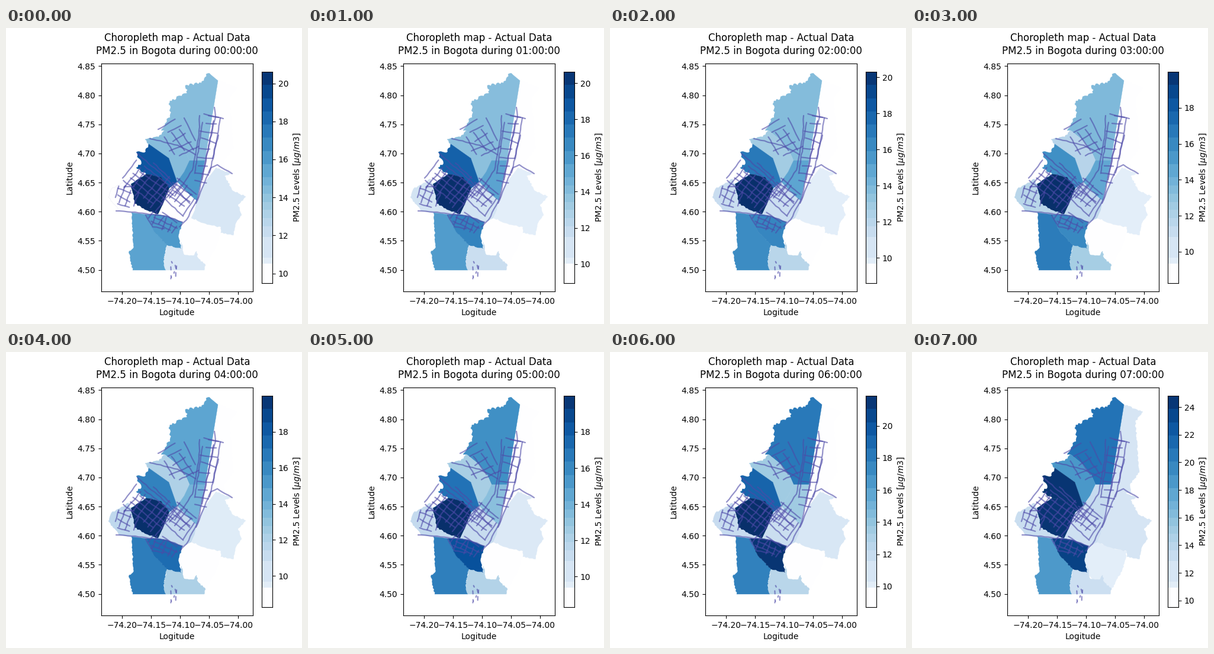
A matplotlib script that plays this animation: 500x500 px, repeating every 8 s.

```python
import numpy as np
import matplotlib.pyplot as plt
from matplotlib.animation import FuncAnimation
from matplotlib.collections import LineCollection
from matplotlib.patches import Polygon, Rectangle

SIZE = 500
HOURS = 8
LEFT, RIGHT, TOP, BOTTOM = 161, 416.675, 60, 445
BAR_TOP, BAR_BOTTOM = 74.25, 430.75
PAPER = "#fefeff"
KEY_HOURS = [0, 1, 3, 6, 7]
LOW = [9.5, 8.95, 8.6, 8.26, 8.28, 8.31, 8.71, 9.53]
HIGH = [20.6, 20.62, 20.3, 19.99, 19.99, 19.99, 21.86, 24.81]

rng = np.random.default_rng(7)
blues = plt.get_cmap("Blues")
fig = plt.figure(figsize=(5, 5), dpi=100, facecolor="white")


def pixel_axes(left, top, right, bottom):
    """Axes whose data units are stage pixels, y downwards."""
    a = fig.add_axes([left / SIZE, 1 - bottom / SIZE,
                      (right - left) / SIZE, (bottom - top) / SIZE])
    a.set_xlim(left, right)
    a.set_ylim(bottom, top)
    return a


ax = pixel_axes(LEFT, TOP, RIGHT, BOTTOM)


def line(*xy):
    return np.array(xy, float).reshape(-1, 2)


def rough(pts, amp, step=2.6):
    """Polyline with small random offsets across its direction."""
    out = []
    for a, b in zip(pts[:-1], pts[1:]):
        d = b - a
        length = np.hypot(*d)
        normal = np.array([-d[1], d[0]]) / length
        n = max(1, int(length / step))
        out += [a + d * k / n + normal * (rng.uniform(-amp, amp) if k else 0)
                for k in range(n)]
    return np.array(out + [pts[-1]])


def coast(*xy, amp=1.2):
    return rough(line(*xy), amp)


districts = []


def district(levels, *pieces):
    """Area with its share of the colour range at the key hours."""
    patch = ax.add_patch(Polygon(np.vstack(pieces), closed=True, lw=0.3))
    districts.append((patch, np.broadcast_to(levels, len(KEY_HOURS))))


# Borders shared by neighbouring districts
suba_north = line(268, 173, 289, 190, 303, 208, 310, 224)
suba_west = line(241, 196, 275, 220, 282, 240, 289, 260)
airport_top = coast(211, 264, 237, 247, 262, 252, 276, 271, amp=0.9)
airport_low = coast(211, 264, 217, 297, 240, 309, 257, 315)
avenue = line(257, 315, 266, 296, 276, 271)
foothill = line(322, 292, 319, 308, 313, 321)
hill = coast(237, 315, 250, 344, 272, 367, amp=1)
valley = coast(272, 367, 296, 373, amp=0.8)
ridge = coast(296, 373, 291, 352, 298, 328, amp=1)

district([0, 0, 0, 0, .17],
         coast(358, 89, 390, 101, 377, 118, 382, 180, 384, 203, 368, 224,
               371, 238, 355, 236),
         line(335, 262, 322, 292, 336, 224))
district([0, 0, 0, 0, .10],
         coast(298, 328, 313, 321, 340, 332, 363, 336, 355, 368, 337, 401),
         line(305, 384), ridge)
district([.43, .43, .45, .72, .74],
         line(358, 89),
         coast(346, 79, 338, 78, 330, 93, 303, 97, 306, 110, 277, 123,
               277, 148, 262, 173, amp=2.4),
         suba_north, line(336, 224))
district([.43, .42, .30, .37, .60],
         suba_north, line(301, 243), suba_west[::-1],
         coast(241, 196, 235, 188, 258, 184, 268, 173))
district([.59, .55, .53, .37, .25],
         line(310, 224, 336, 224, 322, 292, 310, 282, 289, 260, 301, 243))
district([.85, .81, .63, .80, .98],
         suba_west, airport_top[::-1],
         coast(237, 247, 220, 236, 229, 229, 220, 210, 236, 209, 241, 196,
               amp=2))
district([1, 1, 1, 1, .98], airport_top, avenue[::-1], airport_low[::-1])
district([.05, .18, .29, .24, .23],
         airport_low, line(212, 312),
         coast(191, 309, 173, 286, 178, 272, 207, 255, 211, 264))
district([0, .18, .27, .23, .21],
         avenue, line(289, 260, 310, 282), foothill, line(298, 328, 272, 318))
district([.55, .58, .71, .69, .59],
         line(212, 312), hill, coast(272, 367, 266, 394, 270, 409),
         coast(214, 409, 208, 377, 216, 370, 212, 312))
district([.59, .68, .66, .98, .93],
         hill, valley, ridge, line(272, 318, 257, 315))
district([.16, .23, .35, .29, .22],
         coast(270, 409, 266, 394, 272, 367), valley,
         coast(296, 362, 301, 383, 318, 384, 322, 377, 324, 388, 337, 401,
               335, 409))
district([.16, .10, .10, .16, .17],
         foothill[::-1], line(335, 262),
         coast(355, 236, 381, 246, 369, 250, 383, 275, 405, 285, 392, 298,
               398, 316, 388, 330, 384, 350, 363, 346, 363, 336, 340, 332,
               313, 321))

roads = []


def road(*xy):
    roads.append(rough(line(*xy), 0.7, 6))


def street_grid(cx, cy, length, width, angle, gap):
    """Broken, slightly crooked streets along and across one direction."""
    a = np.radians(angle)
    along = np.array([np.cos(a), np.sin(a)])
    across = np.array([-along[1], along[0]])
    for u, v, reach, span in ((along, across, length, width),
                              (across, along, width, length)):
        for offset in np.arange(-span / 2, span / 2 + 1, gap):
            start = -reach * rng.uniform(0.2, 0.5)
            stop = reach * rng.uniform(0.2, 0.5)
            tilt = rng.uniform(-3, 3, 2)
            road(*((cx, cy) + u * start + v * (offset + tilt[0])),
                 *((cx, cy) + u * stop + v * (offset + tilt[1])))


# Main avenues
road(352, 134, 354, 150, 340, 210, 324, 287, 305, 324, 293, 336)
road(327, 148, 326, 180, 315, 240, 285, 284)
road(382, 246, 357, 231, 346, 236, 321, 296)
road(342, 148, 367, 153)
road(362, 152, 354, 198, 349, 220)
road(186, 309, 212, 311, 272, 318, 298, 328)
road(236, 316, 248, 336, 267, 339)
road(222, 212, 275, 258, 310, 296)
road(243, 187, 290, 198, 320, 214)

# Neighbourhoods
street_grid(337, 208, 120, 32, 101, 14)
street_grid(292, 188, 62, 50, 62, 14)
street_grid(244, 266, 84, 64, 38, 11)
street_grid(292, 284, 62, 48, 40, 11)
street_grid(202, 284, 34, 34, 20, 11)
street_grid(267, 330, 52, 24, 30, 9)
for _ in range(8):
    x, y = rng.uniform(270, 289), rng.uniform(392, 422)
    road(x, y, x + rng.uniform(-2, 2), y + rng.uniform(2, 7))

ax.add_collection(LineCollection(roads, colors=[(0.30, 0.29, 0.66, 0.6)],
                                 linewidths=1.6, capstyle="round", zorder=3))

ax.set_xticks(196.4 + 49 * np.arange(5),
              [f"\u2212{74.2 - 0.05 * k:.2f}" for k in range(5)])
ax.set_yticks(408.5 - 49.15 * np.arange(8),
              [f"{4.5 + 0.05 * k:.2f}" for k in range(8)])
ax.set_xlabel("Logitude")
ax.set_ylabel("Latitude")


def heading(baseline, text=""):
    return fig.text((LEFT + RIGHT) / 2 / SIZE, 1 - baseline / SIZE, text,
                    ha="center", va="baseline", fontsize=12)


heading(22, "Choropleth map - Actual Data")
title = heading(44)

bar = pixel_axes(432.175, BAR_TOP, 450, BAR_BOTTOM)
bar.set_xticks([])
bar.yaxis.tick_right()
bar.yaxis.set_label_position("right")
bar.set_ylabel(r"PM2.5 Levels [$\mu g/m3$]")

# Wide bands in the dark half, narrow ones below, white at the foot
edges = [*np.linspace(BAR_TOP, 252, 9)[:-1], *np.linspace(252, 335, 7),
         353, 388, 398, BAR_BOTTOM]
for top, bottom in zip(edges[:-1], edges[1:]):
    t = (BAR_BOTTOM - (top + bottom) / 2) / (BAR_BOTTOM - BAR_TOP)
    color = PAPER if bottom == BAR_BOTTOM else blues(t)
    bar.add_patch(Rectangle((432, top), 19, bottom - top, fc=color, lw=0,
                            antialiased=False))


def draw(hour):
    title.set_text(f"PM2.5 in Bogota during {hour:02d}:00:00")
    for patch, levels in districts:
        t = np.interp(hour, KEY_HOURS, levels)
        color = PAPER if t < 0.09 else blues(t)
        patch.set_facecolor(color)
        patch.set_edgecolor("#e9e9f0" if 0.04 < t < 0.09 else color)
    low, high = LOW[hour], HIGH[hour]
    ticks = np.arange(2 * np.ceil(low / 2), high, 2)
    scale = (BAR_BOTTOM - BAR_TOP) / (high - low)
    bar.set_yticks(BAR_BOTTOM - (ticks - low) * scale,
                   [f"{v:.0f}" for v in ticks])
    return []


anim = FuncAnimation(fig, draw, frames=HOURS, interval=1000, repeat=True,
                     repeat_delay=0, blit=False)
plt.show()
```
